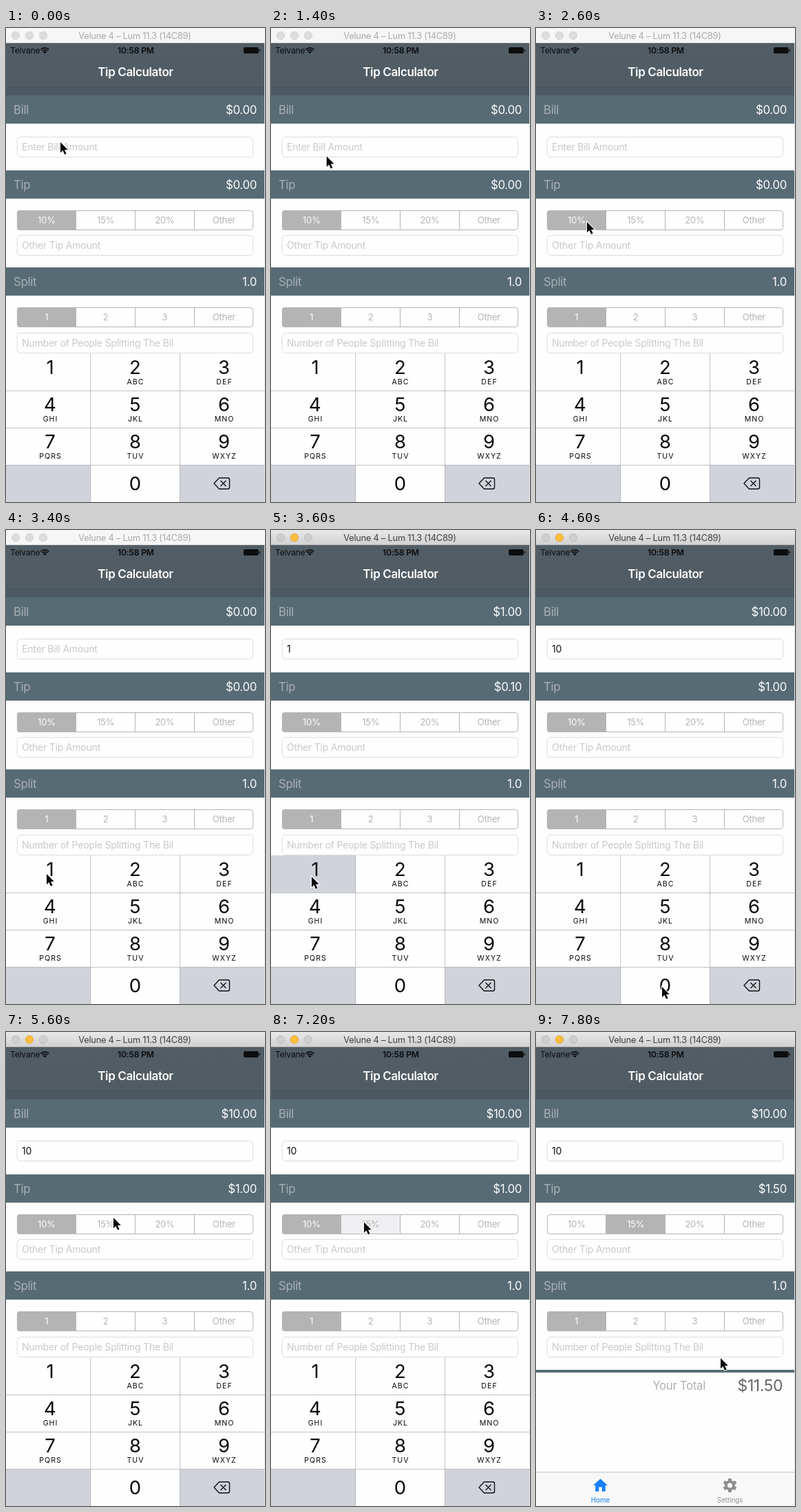
Recreate the animation shown at these times as an HTML page with a canvas. Size 376 px wide and 689 px high, loop 8000 ms.

```html
<!DOCTYPE html>
<html lang="en">
<head>
<meta charset="utf-8">
<title>Tip Calculator</title>
<style>
  html, body { margin: 0; width: 100%; height: 100%; overflow: hidden; background: #fefefe; }
  canvas { display: block; width: 376px; height: 689px; }
</style>
</head>
<body>
<canvas id="stage"></canvas>
<script>
const W = 376, H = 689, LOOP = 8000, STEP = 200;
const BAND = '#576b74', GREY = '#b4b4b5', HINT = '#c9c9ce', LINE = '#b2b3b9', KEY_DOWN = '#d0d3da';
const canvas = document.getElementById('stage');
const ctx = canvas.getContext('2d');
const dpr = window.devicePixelRatio || 1;
canvas.width = W * dpr;
canvas.height = H * dpr;

// Pointer path: time, x, y
const path = [
  [0, 79, 166], [1200, 82, 172], [2000, 77, 230], [2200, 77, 230], [2600, 74, 282],
  [3400, 59, 500], [3600, 59, 504], [3800, 64, 512], [4200, 183, 664], [4600, 183, 664],
  [5600, 156, 270], [5800, 152, 271], [7000, 134, 275], [7400, 136, 278], [7800, 268, 474]
];

const keys = ['', 'ABC', 'DEF', 'GHI', 'JKL', 'MNO', 'PQRS', 'TUV', 'WXYZ'];
const keyX = [64, 187.5, 316.5];

function rect(x, y, w, h, color) {
  ctx.fillStyle = color;
  ctx.fillRect(x, y, w, h);
}

function text(s, x, y, size, color, align = 'left', weight = 400, spacing = -0.018 * size) {
  ctx.font = `${weight} ${size}px Inter, sans-serif`;
  ctx.letterSpacing = spacing + 'px';
  ctx.textAlign = align;
  ctx.fillStyle = color;
  ctx.fillText(s, x, y);
}

function disc(x, y, r, fill, stroke) {
  ctx.beginPath();
  ctx.arc(x, y, r, 0, 7);
  ctx.fillStyle = fill;
  ctx.fill();
  if (stroke) {
    ctx.strokeStyle = stroke;
    ctx.lineWidth = 0.8;
    ctx.stroke();
  }
}

function poly(points) {
  ctx.beginPath();
  points.forEach(([x, y]) => ctx.lineTo(x, y));
  ctx.closePath();
}

function vertical(y0, y1, from, to) {
  const g = ctx.createLinearGradient(0, y0, 0, y1);
  g.addColorStop(0, from);
  g.addColorStop(1, to);
  return g;
}

function titleBar(active) {
  rect(0, 0, W, 22, active ? vertical(0, 22, '#e9e8e9', '#d2d1d2') : '#f6f6f6');
  rect(0, 21, W, 1, active ? '#b5b4b5' : '#d8d8d8');
  const off = active ? ['#cfcecf', '#bab9ba'] : ['#dddddd', '#cecece'];
  const amber = ['#fdbd3d', '#dfa02f'];
  [14, 34, 54].forEach((x, i) => disc(x, 11, 5.7, ...(active && i === 1 ? amber : off)));
  text('Velune 4 – Lum 11.3 (14C89)', 187, 16, 12.8, active ? '#414041' : '#a9a9a9', 'center');
}

function wifi(x, y) {
  ctx.strokeStyle = '#0b0d0f';
  ctx.lineWidth = 1.7;
  [8.4, 5.5].forEach(r => {
    ctx.beginPath();
    ctx.arc(x, y, r, -Math.PI * 0.75, -Math.PI * 0.25);
    ctx.stroke();
  });
  ctx.beginPath();
  ctx.moveTo(x, y);
  ctx.arc(x, y, 3.4, -Math.PI * 0.75, -Math.PI * 0.25);
  ctx.fillStyle = '#0b0d0f';
  ctx.fill();
}

function header() {
  rect(0, 22, 375, 64, vertical(22, 86, '#525d65', '#505b63'));
  rect(0, 86, 375, 12, '#4b5a62');
  rect(0, 85.5, 375, 0.7, '#424d54');
  text('Telvane', 6, 36.5, 12.2, '#0b0d0f');
  wifi(56.3, 37.3);
  text('10:58 PM', 188.5, 36.5, 12.2, '#0b0d0f', 'center', 600);
  ctx.beginPath();
  ctx.roundRect(345, 28, 21.5, 9, 1.8);
  ctx.fill();
  rect(367.4, 31, 1.5, 3, '#0b0d0f');
  text('Tip Calculator', 188, 70, 17, '#fdfdfd', 'center', 600, -0.38);
}

function band(y, label, value) {
  rect(0, y, 375, 41, BAND);
  text(label, 11, y + 27, 16.8, '#a9b1b5');
  text(value, 364, y + 27, 16.8, '#fbfcfc', 'right');
}

function field(y, value, hint) {
  ctx.beginPath();
  ctx.roundRect(16.2, y + 0.5, 342.5, 29, 5);
  ctx.strokeStyle = '#dcdcdd';
  ctx.lineWidth = 1;
  ctx.stroke();
  text(value || hint, 23, y + 20, 14.1, value ? '#111' : HINT);
}

function segments(y, labels, selected, pressed) {
  const w = 85.8;
  ctx.save();
  ctx.beginPath();
  ctx.roundRect(16, y, 343, 29, 4);
  ctx.clip();
  if (pressed >= 0) rect(16 + pressed * w, y, w, 29, '#f0eff1');
  rect(16 + selected * w, y, w, 29, GREY);
  [1, 2, 3].forEach(i => rect(Math.floor(16 + i * w), y, 1, 29, GREY));
  ctx.restore();
  ctx.beginPath();
  ctx.roundRect(16.4, y + 0.5, 342.2, 28, 4);
  ctx.strokeStyle = GREY;
  ctx.lineWidth = 1;
  ctx.stroke();
  labels.forEach((s, i) =>
    text(s, 16 + (i + 0.5) * w, y + 19, 13, i === selected ? '#fdfdfd' : GREY, 'center'));
}

function home(x, y) {
  ctx.fillStyle = '#157efb';
  poly([[x, y - 9.5], [x + 10.5, y], [x + 7.3, y], [x + 7.3, y + 8.7], [x + 2.2, y + 8.7], [x + 2.2, y + 2.5],
    [x - 2.2, y + 2.5], [x - 2.2, y + 8.7], [x - 7.3, y + 8.7], [x - 7.3, y], [x - 10.5, y]]);
  ctx.fill();
}

function gear(x, y) {
  const points = [];
  for (let i = 0; i < 6; i++) {
    const a = i * Math.PI / 3 + Math.PI / 6 - Math.PI / 6;
    [[-0.37, 7.4], [-0.23, 10.3], [0.23, 10.3], [0.37, 7.4]].forEach(([d, r]) =>
      points.push([x + r * Math.sin(a + d), y - r * Math.cos(a + d)]));
  }
  poly(points);
  ctx.moveTo(x + 3.6, y);
  ctx.arc(x, y, 3.6, 0, 7);
  ctx.fillStyle = '#8e8e8f';
  ctx.fill('evenodd');
}

function footer(total) {
  rect(0, 491, 375, 4, BAND);
  text('Your Total', 246, 520, 16.8, '#b0b0b0', 'right');
  text(total, 358, 522, 23, '#666', 'right');
  rect(0, 639.5, 375, 49.5, '#f8f8f8');
  rect(0, 639.5, 375, 0.8, '#b5b5b6');
  home(93.5, 659);
  text('Home', 93.5, 683.5, 9.8, '#157efb', 'center', 400, 0);
  gear(281.5, 659);
  text('Settings', 281.5, 683.5, 9.8, '#929292', 'center', 400, 0);
}

function deleteIcon(x, y) {
  ctx.strokeStyle = '#111';
  ctx.lineWidth = 1.4;
  ctx.lineJoin = 'round';
  ctx.beginPath();
  ctx.moveTo(x, y);
  ctx.lineTo(x + 7.5, y - 8);
  ctx.lineTo(x + 20, y - 8);
  ctx.quadraticCurveTo(x + 22.5, y - 8, x + 22.5, y - 5.5);
  ctx.lineTo(x + 22.5, y + 5.5);
  ctx.quadraticCurveTo(x + 22.5, y + 8, x + 20, y + 8);
  ctx.lineTo(x + 7.5, y + 8);
  ctx.closePath();
  [-1, 1].forEach(s => {
    ctx.moveTo(x + 9.5, y - 4 * s);
    ctx.lineTo(x + 17.5, y + 4 * s);
  });
  ctx.stroke();
}

function keyboard(dy, pressed) {
  ctx.save();
  ctx.translate(0, dy);
  rect(0, 473, 375, 216, '#fefefe');
  rect(0, 635, 123, 54, KEY_DOWN);
  rect(252, 635, 123, 54, KEY_DOWN);
  if (pressed === 1) rect(0, 473, 123, 54, KEY_DOWN);
  if (pressed === 0) rect(123, 635, 129, 54, KEY_DOWN);
  [527, 581, 635].forEach(y => rect(0, y, 375, 0.8, LINE));
  [122.4, 252].forEach(x => rect(x, 473, 0.8, 216, LINE));
  keys.forEach((letters, i) => {
    const x = keyX[i % 3], y = 503 + 54 * Math.floor(i / 3);
    text(i + 1, x, y, 27.5, '#0a0a0a', 'center', 400, 0);
    text(letters, x + 0.5, y + 15, 10.6, '#0a0a0a', 'center', 400, 1);
  });
  text('0', keyX[1], 672, 27.5, '#0a0a0a', 'center', 400, 0);
  deleteIcon(302, 662);
  ctx.restore();
}

function pointer(t) {
  const i = path.findIndex(p => p[0] > t);
  const b = i < 0 ? path[path.length - 1] : path[i];
  const a = i < 0 ? b : path[i - 1];
  const k = a === b ? 0 : (t - a[0]) / (b[0] - a[0]);
  ctx.save();
  ctx.translate(a[1] + (b[1] - a[1]) * k, a[2] + (b[2] - a[2]) * k);
  poly([[0, 0], [0, 15.2], [3.4, 12], [6, 17.8], [8.6, 16.7], [6.1, 11], [10.8, 11]]);
  ctx.strokeStyle = '#fff';
  ctx.lineWidth = 2;
  ctx.lineJoin = 'miter';
  ctx.stroke();
  ctx.fillStyle = '#080808';
  ctx.fill();
  ctx.restore();
}

function draw(t) {
  const bill = t < 3600 ? 0 : t < 4400 ? 1 : 10;
  const rate = t < 7400 ? 0 : 1;
  const tip = bill * (rate ? 0.15 : 0.1);
  const money = n => '$' + n.toFixed(2);
  const pressed = t >= 3600 && t < 3800 ? 1 : t >= 4400 && t < 4600 ? 0 : -1;
  const slide = Math.min(1, Math.max(0, (t - 7400) / 300));

  ctx.setTransform(dpr, 0, 0, dpr, 0, 0);
  rect(0, 0, W, H, '#fefefe');
  titleBar(t >= 3600);
  header();
  band(98, 'Bill', money(bill));
  field(158, bill ? String(bill) : '', 'Enter Bill Amount');
  band(207, 'Tip', money(tip));
  segments(265, ['10%', '15%', '20%', 'Other'], rate, t >= 7200 && t < 7400 ? 1 : -1);
  field(301, '', 'Other Tip Amount');
  band(348, 'Split', '1.0');
  segments(406, ['1', '2', '3', 'Other'], 0, -1);
  field(443, '', 'Number of People Splitting The Bil');
  footer(money(bill + tip));
  if (slide < 1) keyboard(216 * slide * (2 - slide), pressed);
  rect(375, 22, 1, H - 22, '#e6e7e8');
  pointer(t);
}

const start = performance.now();
function tick() {
  const t = (performance.now() - start) % LOOP;
  draw(Math.floor(t / STEP) * STEP);
  requestAnimationFrame(tick);
}
tick();
</script>
</body>
</html>
```
